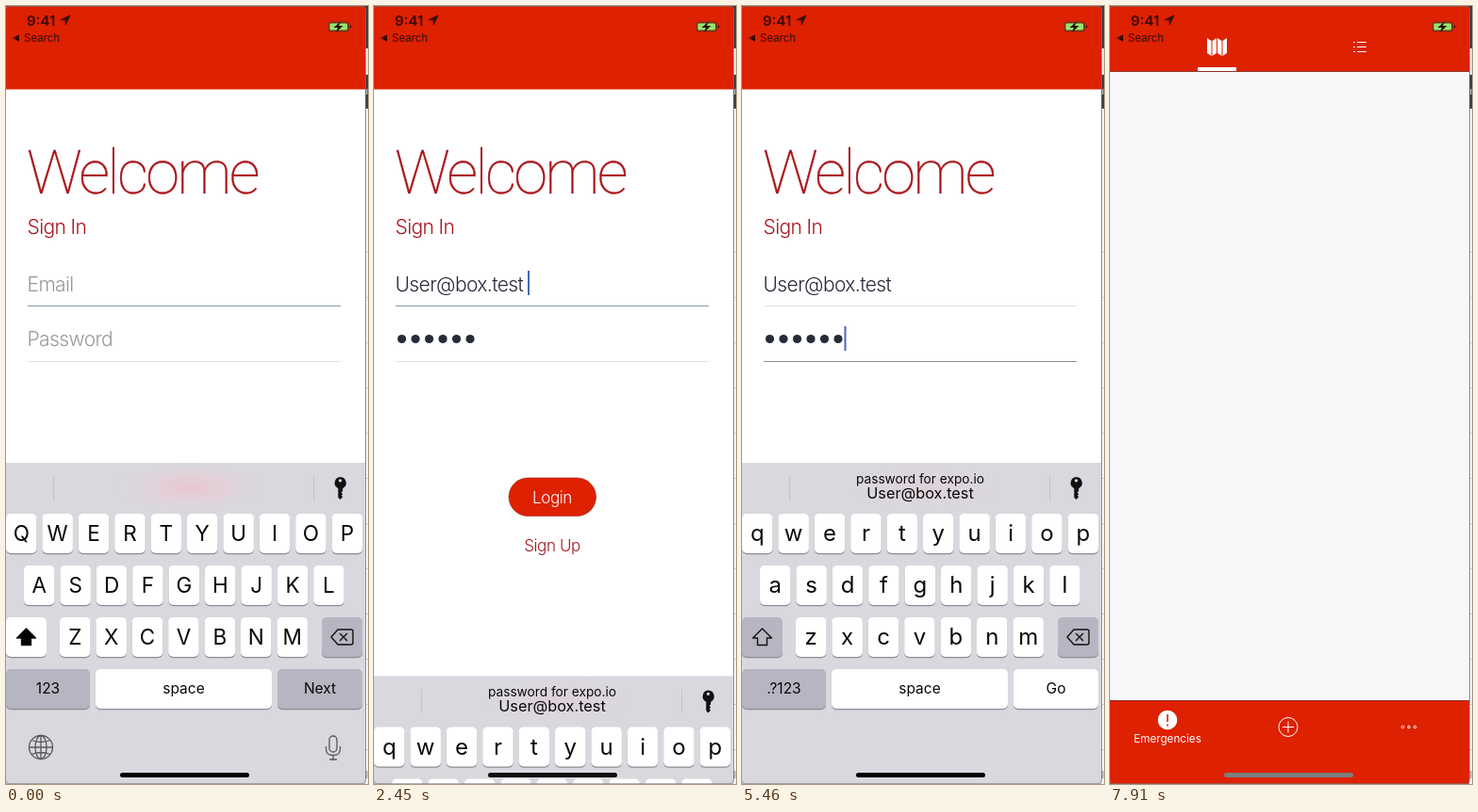
An HTML page that plays this animation: 384x826 px, repeating every 8000 ms.

```html
<!DOCTYPE html>
<html lang="en">
<head>
<meta charset="utf-8">
<style>
  html, body { margin: 0; width: 100%; height: 100%; overflow: hidden; background: #fff; }
  svg { display: block; font-family: Inter, Roboto, sans-serif; }
  .mid { text-anchor: middle; }
  .form { font-size: 21px; font-weight: 300; letter-spacing: -.6px; }
  .line { fill: none; stroke: #111; stroke-width: 1.4; stroke-linejoin: round; }
  .white { fill: none; stroke: #fff; }
</style>
</head>
<body>
<svg width="384" height="826" viewBox="0 0 384 826">
  <defs>
    <radialGradient id="tint">
      <stop offset="0" stop-color="#f3b9c4"/><stop offset=".5" stop-color="#eec9d3" stop-opacity=".7"/>
      <stop offset="1" stop-color="#e4d3dc" stop-opacity="0"/>
    </radialGradient>
    <linearGradient id="violet"><stop stop-color="#5b7bea"/><stop offset="1" stop-color="#7657d8"/></linearGradient>
    <linearGradient id="blue"><stop stop-color="#4c78e6"/><stop offset="1" stop-color="#62a2f6"/></linearGradient>
  </defs>
  <rect width="384" height="826" fill="#fff"/>
  <rect id="header" width="384" height="88.5" fill="#de2100"/>

  <g id="login">
    <text x="22" y="199" font-family="Roboto, Inter, sans-serif" font-size="65" font-weight="100"
      letter-spacing="-2.7" fill="#a8161a" stroke="#a8161a" stroke-width=".4">Welcome</text>
    <g class="form">
      <text x="22.500" y="242" fill="#a3151b">Sign In</text>
      <text id="email" x="22.500" y="302.500"></text>
      <text id="hint" x="22.500" y="361" fill="#99999c">Password</text>
    </g>
    <g id="dots" fill="#272b38"></g>
    <path id="emailLine" d="M23 318.500H355"/>
    <path id="passLine" d="M23 377.500H355"/>
    <rect id="caret" width="2" height="26" fill="#4569b8"/>
    <rect x="143" y="501" width="92.500" height="40.500" rx="20.250" fill="#de2100" stroke="#a92a1a" stroke-width=".7"/>
    <g class="mid" font-size="17" font-weight="300" letter-spacing="-.4">
      <text x="189" y="528" fill="#fff">Login</text>
      <text x="189" y="579" fill="#a3151b">Sign Up</text>
    </g>
  </g>

  <g id="tabs">
    <rect y="69" width="382" height="669" fill="#f8f7fa"/>
    <path d="M0 69.500H382M0 737.500H382" stroke="#8d3127"/>
    <rect y="738" width="382" height="88" fill="#de2100"/>
    <path d="M103 34l4.500 3v16l-4.500-3zM108.500 37l4.500-3v16l-4.500 3zM114 34l4.500 3v16l-4.500-3zM119.500 37l4.500-3v16l-4.500 3z" fill="#fff"/>
    <rect x="93" y="65" width="41" height="4" fill="#fff"/>
    <path class="white" d="M258 38.500h2m2 0h10M258 43.500h2m2 0h10M258 48.500h2m2 0h10" stroke-width="1.200"/>
    <circle cx="61" cy="758" r="10.300" fill="#fff"/>
    <path d="M61 752v8m0 2.500v2" stroke="#de2100" stroke-width="1.600"/>
    <text class="mid" x="61" y="782" font-size="11.700" fill="#fff">Emergencies</text>
    <g class="white">
      <circle cx="189" cy="765.500" r="10"/><path d="M183 765.500h12m-6-6v12"/>
      <circle cx="310.500" cy="765.500" r="1.300"/><circle cx="317" cy="765.500" r="1.300"/><circle cx="323.500" cy="765.500" r="1.300"/>
    </g>
  </g>

  <g id="keyboard"></g>

  <g id="popup">
    <rect x="110" y="334" width="158" height="158" rx="9" fill="#e9e7ee"/>
    <g fill="none" stroke-width="5">
      <ellipse id="ringA" cx="190" cy="398.500" rx="36" stroke="url(#violet)"/>
      <ellipse id="ringB" cx="190" cy="398.500" rx="35" stroke="url(#blue)"/>
    </g>
    <g id="success" class="white" stroke-width="3.600" stroke-linecap="round" stroke-linejoin="round">
      <circle cx="189" cy="398" r="34.500"/>
      <path id="tick" d="M173 400l11 11 21-23" pathLength="1" stroke-dasharray="1 2"/>
    </g>
    <text class="mid" x="188.500" y="472" font-size="15.500" font-weight="600" fill="#6d6b72">Look In</text>
  </g>

  <g fill="#390c06">
    <text x="22" y="20.500" font-size="15" font-weight="600">9:41</text>
    <path id="arrow" d="M68 10l-10 4.800h5.200V20z" stroke="#390c06" stroke-linejoin="round"/>
    <path d="M7 34l7-3.700v7.400z"/>
    <text x="19" y="38" font-size="11.500">Search</text>
    <rect x="341.500" y="16.500" width="22.500" height="11" rx="3" fill="#7b3318"/>
    <rect x="343.500" y="18.500" width="18.500" height="7" rx="1.200" fill="#9be36a"/>
    <path d="M365 20v4l1.500-2z"/>
    <path d="M355 16.500l-7.500 6.500h4.500l-2 5 7.500-7h-4.500z" fill="#1d1109"/>
  </g>
  <rect id="home" x="121" y="814" width="137" height="5" rx="2.500"/>

  <g id="edge">
    <rect x="381" width="3" height="826" fill="#f5f5f5"/>
    <path d="M382.500 0V45M382.500 73V109" stroke="#3d3d40" stroke-width="3"/>
    <path d="M382.500 45V73" stroke="#e6e6e6" stroke-width="3"/>
    <path d="M382.500 88v6M382.500 812v8" stroke="#aaa" stroke-width="2"/>
    <path d="M382.500 261V800" stroke="#d2d2d2" stroke-width="3" stroke-dasharray="1 47"/>
    <rect x="-.5" y=".3" width="382" height="825.500" rx="4" fill="none" stroke="#777" stroke-width=".8"/>
  </g>
</svg>
<script>
const LOOP = 8000;
const EMAIL = 'User@box.test';
const $ = id => document.getElementById(id);
const ramp = (t, from, to) => Math.min(1, Math.max(0, (t - from) / (to - from)));
const smooth = (t, from, to) => { const p = ramp(t, from, to); return p * p * (3 - 2 * p); };
const mix = (a, b, p) => a + (b - a) * p;
const within = (t, from, to) => t >= from && t < to;
const show = (id, on) => $(id).style.display = on ? '' : 'none';
const set = (id, attrs) => { for (const name in attrs) $(id).setAttribute(name, attrs[name]); };

const GREY = '#b6b6c3';
const label = (x, y, text, size, fill = '#080808') =>
  `<text class="mid" x="${x}" y="${y}" font-size="${size}" fill="${fill}">${text}</text>`;
const key = (x, y, w, text = '', size = 15.5, fill = '#fff', ink) =>
  `<rect x="${x}" y="${y + 1.2}" width="${w}" height="42" rx="5" fill="#8d8c93"/>
   <rect x="${x}" y="${y}" width="${w}" height="42" rx="5" fill="${fill}"/>` +
  label(x + w / 2, y + 21 + size * .35, text, size, ink);
const keyRow = (letters, x, y, size) =>
  [...letters].map((c, i) => key(x + i * 38.4, y, 32.5, c, size)).join('');

function keyboard({ caps, bar, go, pressed }) {
  const letterCase = s => caps ? s : s.toLowerCase();
  const size = caps ? 22.5 : 24;
  const rows = [['QWERTYUIOP', 0, 539], ['ASDFGHJKL', 19, 594], ['ZXCVBNM', 57, 649]];
  const action = pressed ? '#fff' : go ? '#0a79f5' : GREY;
  let out = '<rect y="485" width="382" height="341" fill="#d9d8de"/>';
  if (bar) {
    out += `<ellipse cx="195" cy="511" rx="80" ry="28" fill="url(#tint)" opacity="${caps ? .6 : .25}"/>
      <path d="M50.500 499v26M326.500 499v26" stroke="#c5c4cb"/>`;
    if (!caps) out += label(189, 507, 'password for expo.io', 13.7) + label(189, 523, EMAIL, 16.3);
  }
  out += `<path fill-rule="evenodd" fill="#111" d="M354.500 500a6.500 6.500 0 0 1 2.700 12.300v2.700l-1.500 1.500 1.500 1.700-1.500 1.500 1.500 1.600-2.700 2.700-2.200-2.200v-9.500a6.500 6.500 0 0 1 2.200-12.300zm0 2.300a1.600 1.600 0 1 0 .01 0z"/>`;
  out += rows.map(([s, x, y]) => keyRow(letterCase(s), x, y, size)).join('');
  out += key(0, 649, 43, '', 1, caps ? '#fff' : GREY) + key(335, 649, 43, '', 1, GREY);
  out += `<path class="line" ${caps ? 'style="fill:#000"' : ''} d="M21.500 661l10 10h-5v7.500h-10v-7.500h-5z"/>
    <path class="line" d="M345 670l7-8h14q2 0 2 2v12q0 2-2 2h-14zM354 666l8 8m0-8l-8 8"/>`;
  out += key(0, 704, 89, caps ? '123' : '.?123', 15.5, GREY) + key(95, 704, 187, 'space') +
    key(288, 704, 90, go ? 'Go' : 'Next', 15.5, action, go && !pressed ? '#fff' : undefined);
  if (!go) out += `<g class="line" style="stroke:#58585d;stroke-width:1.3">
      <circle cx="37" cy="787" r="12.500"/><ellipse cx="37" cy="787" rx="6" ry="12.500"/>
      <path d="M37 774.500v25M24.500 787h25M27 779.500q10 4 20 0M27 794.500q10-4 20 0"/>
      <rect x="343" y="775" width="8" height="17" rx="4"/><path d="M339.500 786v3q0 6.500 7.500 6.500t7.500-6.500v-3M347 795.500v4.500m-4 0h8"/></g>`;
  return out;
}

$('dots').innerHTML = [0, 1, 2, 3, 4, 5]
  .map(i => `<circle cx="${29.5 + i * 14.5}" cy="353.5" r="4.6"/>`).join('');

let keyboardState = '';
function drawKeyboard(t) {
  const state = {
    caps: t < 2000,
    bar: t < 350 || t > 2000,
    go: t >= 4400,
    pressed: within(t, 4270, 4400) || t >= 5350,
  };
  const next = JSON.stringify(state);
  if (next !== keyboardState) $('keyboard').innerHTML = keyboard(state);
  keyboardState = next;
  const drop = t < 2000 ? smooth(t, 1450, 1750)
    : t < 5000 ? (1 - ramp(t, 2400, 2800)) ** 3
    : smooth(t, 5540, 5880);
  set('keyboard', { transform: `translate(0 ${341 * drop})` });
  show('keyboard', drop < 1);
}

function drawForm(t) {
  const filled = t >= 1450;
  const onPassword = within(t, 1450, 2400) || t >= 4400;
  const focusTime = t - (t < 4400 ? 2400 : 4400);
  $('email').textContent = filled ? EMAIL : 'Email';
  set('email', { fill: filled ? '#272b38' : '#99999c' });
  show('hint', !filled);
  show('dots', filled);
  set('emailLine', { stroke: onPassword ? '#e2e2e4' : '#8299a8' });
  set('passLine', { stroke: onPassword ? '#909194' : '#e2e2e4' });
  show('caret', focusTime >= 0 && focusTime % 1000 < 550);
  set('caret', onPassword ? { x: 108.5, y: 340 } : { x: 163, y: 281 });
}

function drawPopup(t) {
  const u = (t - 980) / 1000;
  const spin = smooth(t, 600, 850) * (1 - smooth(t, 1200, 1400));
  const done = smooth(t, 1330, 1450);
  const ring = (id, turn, tilt) => set(id, {
    ry: mix(35, 35 * Math.abs(Math.cos(tilt)), spin),
    transform: `rotate(${turn} 190 398.5)`,
    opacity: 1 - done,
  });
  ring('ringA', -77 + 200 * u, 1.2 + 5 * u);
  ring('ringB', -32 + 120 * u, 1.05 - 4 * u);
  set('success', { opacity: done });
  set('tick', { 'stroke-dashoffset': 1 - smooth(t, 1400, 1600) });
  set('popup', { opacity: smooth(t, 280, 530) * (1 - smooth(t, 1980, 2230)) });
}

function draw(t) {
  const loggedIn = t >= 7210;
  show('login', t < 5670);
  show('tabs', loggedIn);
  set('header', { height: loggedIn ? 69 : 88.5 });
  set('arrow', { 'fill-opacity': within(t, 6720, 7210) ? 0 : 1 });
  const dim = smooth(t, 350, 700) * (1 - smooth(t, 2250, 2500)) + smooth(t, 7250, 7650);
  const shade = Math.round(125 * dim);
  set('home', { fill: `rgb(${shade},${shade},${shade})` });
  drawForm(t);
  drawKeyboard(t);
  drawPopup(t);
}

function tick() {
  draw(performance.now() % LOOP);
  requestAnimationFrame(tick);
}
tick();
</script>
</body>
</html>
```
